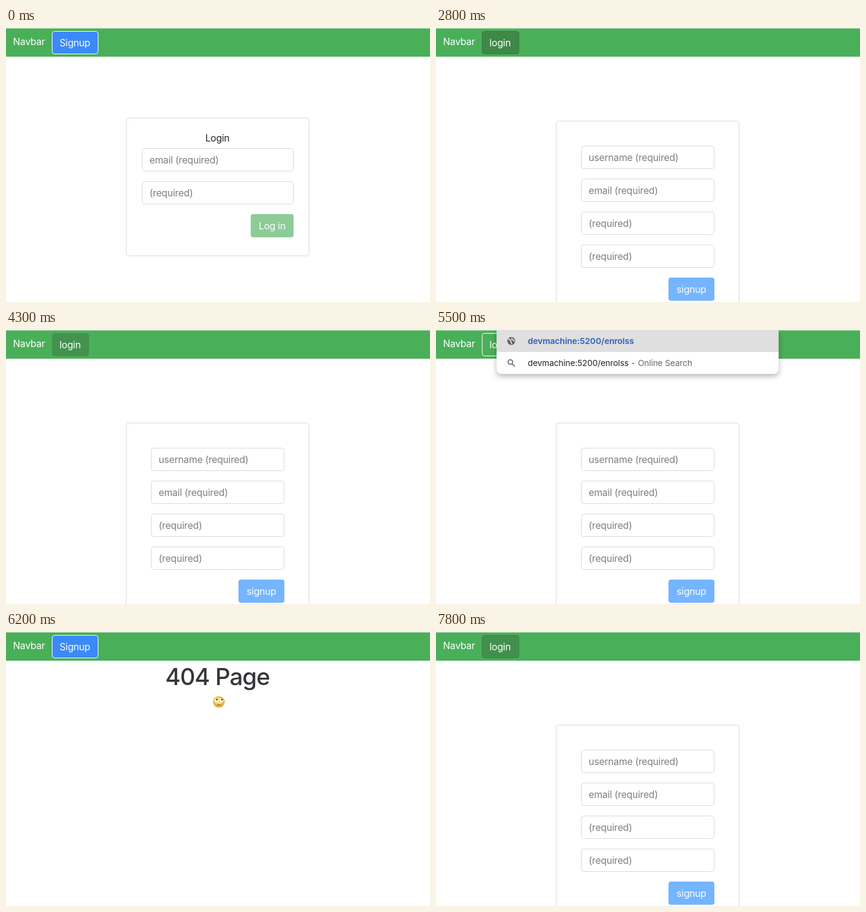
Write an HTML page that moves like this. It is 693 by 449 pixels and loops after 8 s.

```html
<!DOCTYPE html>
<html lang="en">
<head>
<meta charset="utf-8">
<title>Login and signup</title>
<style>
  html, body { margin: 0; width: 100%; height: 100%; overflow: hidden; background: #fff; }
  svg { display: block; width: 100%; height: 100%; }
  text { font: 15.6px Inter, sans-serif; letter-spacing: -.2px; fill: #fff; }
  .hint { fill: #7b7f84; }
  .dark { fill: #212529; }
  .mid { text-anchor: middle; }
  .title { font-size: 38.5px; font-weight: 500; letter-spacing: -1px; fill: #343639; }
  .box { fill: #fff; stroke: #d9dadc; }
  #menu { filter: drop-shadow(0 4px 5px rgba(0, 0, 0, .28)); }
  #menu text { font-size: 13.6px; letter-spacing: -.1px; fill: #222; }
  #menu .match { font-weight: 700; fill: #4169bd; }
  #menu .note { fill: #666; }
</style>
</head>
<body>
<svg viewBox="0 0 693 449">
  <rect width="693" height="47" fill="#4aaf59"/>
  <rect width="693" height="1" fill="#c5dfc9"/>
  <text x="11.5" y="28">Navbar</text>
  <rect id="button" x="75.5" y="5.5" height="37" rx="4"/>
  <text id="label" x="87.5" y="30"></text>

  <g id="login"></g>
  <g id="signup"></g>

  <g id="missing">
    <text class="title mid" x="345.5" y="86.5">404 Page</text>
    <radialGradient id="skin" cy=".4">
      <stop offset=".3" stop-color="#ffe37a"/>
      <stop offset="1" stop-color="#e2ac3c"/>
    </radialGradient>
    <circle cx="348" cy="114.5" r="9.5" fill="url(#skin)"/>
    <g fill="#fff"><circle cx="343.8" cy="112.5" r="3"/><circle cx="352.2" cy="112.5" r="3"/></g>
    <g fill="#5b3b1c"><circle cx="344.7" cy="110.9" r="1.4"/><circle cx="353.1" cy="110.9" r="1.4"/></g>
    <path d="M345 119.5h6" stroke="#855a20" stroke-width="1.2" stroke-linecap="round"/>
  </g>

  <g id="menu">
    <path d="M99 0H560V64a8 8 0 0 1-8 8H107a8 8 0 0 1-8-8Z" fill="#fff"/>
    <rect x="99" width="461" height="36" fill="#dfdfdf"/>
    <circle cx="123" cy="18" r="6.5" fill="#5f6368"/>
    <path d="M118 15q3 0 4 3t2 5M124 13q-1 3 1 3t3 3" fill="none" stroke="#dfdfdf" stroke-width="1.8"/>
    <g fill="none" stroke="#5f6368" stroke-width="1.6">
      <circle cx="121.5" cy="52.5" r="3.8"/><path d="M124.3 55.3l4.3 4.3"/>
    </g>
    <text id="address" class="match" x="150" y="23"></text>
    <text x="150" y="59"><tspan id="query"></tspan><tspan class="note" dx="4">-</tspan><tspan class="note" dx="5">Online Search</tspan></text>
  </g>
</svg>
<script>
const LOOP = 8000;
const $ = id => document.getElementById(id);

const box = (x, y, w, h) =>
  `<rect class="box" x="${x + .5}" y="${y + .5}" width="${w - 1}" height="${h - 1}" rx="4"/>`;
const field = (x, y, w, hint) =>
  box(x, y, w, 38) + `<text class="hint" x="${x + 12.5}" y="${y + 25}">${hint}</text>`;
const submit = (x, y, w, color, label) =>
  `<rect x="${x}" y="${y}" width="${w}" height="38" rx="4" fill="${color}"/>
   <text class="mid" x="${x + w / 2}" y="${y + 25}">${label}</text>`;

$('login').innerHTML = box(196, 147, 300, 227) +
  '<text class="dark mid" x="345.5" y="186">Login</text>' +
  field(222, 197, 248, 'email (required)') +
  field(222, 251, 248, '(required)') +
  submit(400, 305, 70, '#8dcb97', 'Log in');

$('signup').innerHTML = box(196, 152, 300, 320) +
  ['username (required)', 'email (required)', '(required)', '(required)']
    .map((hint, i) => field(237, 193 + 54 * i, 218, hint)).join('') +
  submit(380, 409, 75, '#75b4ff', 'signup');

const pages = [[0, 'login'], [1900, 'signup'], [2900, 'login'], [3700, 'signup'],
               [6200, 'missing'], [7200, 'signup']];
const clicks = [1900, 2900, 3700, 7200];
const hovers = [[0, 0], [1650, 1], [4280, 0], [6950, 1]];
const typing = [[0, ''], [5300, 'devmachine:5200/enrols'], [5500, 'devmachine:5200/enrolss'], [6100, '']];

// Colours as [r, g, b]; each state is [fill, border].
const white = [255, 255, 255];
const styles = {
  toSignup: { width: 75, label: 'Signup', rest: [[60, 137, 250], white],
    hover: [[48, 119, 228], [42, 107, 208]], press: [[40, 104, 204], [36, 95, 188]] },
  toLogin: { width: 60, label: 'login', rest: [[74, 175, 89], white],
    hover: [[66, 144, 77], [59, 130, 69]], press: [[62, 136, 72], [56, 122, 64]] }
};

const latest = (steps, t) => steps.filter(step => step[0] <= t).pop();
const mix = (a, b, k) => `rgb(${a.map((v, i) => Math.round(v + (b[i] - v) * k))})`;

function hoverAmount(t) {
  const [start, on] = latest(hovers, t);
  const k = start ? Math.min(1, (t - start) / 200) : 1;
  return on ? k : 1 - k;
}

function draw(t) {
  const page = latest(pages, t)[1];
  for (const id of ['login', 'signup', 'missing'])
    $(id).style.display = id === page ? '' : 'none';

  const style = page === 'signup' ? styles.toLogin : styles.toSignup;
  const pressed = clicks.some(c => t >= c - 150 && t < c);
  const target = pressed ? style.press : style.hover;
  const k = pressed ? 1 : hoverAmount(t);
  $('button').setAttribute('width', style.width);
  $('button').setAttribute('fill', mix(style.rest[0], target[0], k));
  $('button').setAttribute('stroke', mix(style.rest[1], target[1], k));
  $('label').textContent = style.label;

  const typed = latest(typing, t)[1];
  $('menu').style.display = typed ? '' : 'none';
  $('address').textContent = $('query').textContent = typed;
}

function tick() {
  draw(performance.now() % LOOP);
  requestAnimationFrame(tick);
}
tick();
</script>
</body>
</html>
```
